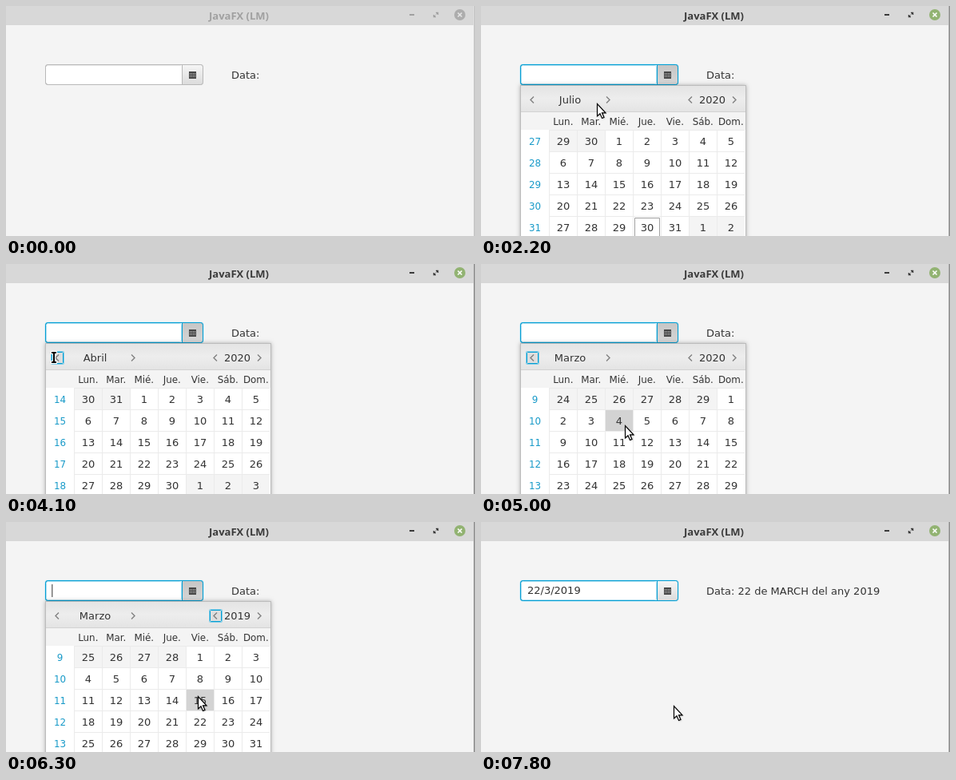
Recreate the animation shown at these times as an HTML page with a canvas. Size 587 px wide and 288 px high, loop 8000 ms.

```html
<!DOCTYPE html>
<html lang="es">
<head>
<meta charset="utf-8">
<title>JavaFX date picker</title>
<style>
  html, body { margin: 0; width: 587px; height: 288px; overflow: hidden; }
  canvas { display: block; }
</style>
</head>
<body>
<canvas id="stage" width="587" height="288"></canvas>
<script>
const LOOP = 8000, STEP = 100;
const ACTIVE = 1300, OPEN = 1600, PRESS = 2700, YEAR_BACK = 5700, CLOSE = 6700, COMMIT = 6900;
const ACCENT = '#039ed3', INK = '#333';
const GRID = { x: 85, y: 155, w: 35, h: 27 };
const TODAY = Date.UTC(2020, 6, 30), DAY = 864e5;
const MONTHS = ['Enero', 'Febrero', 'Marzo', 'Abril', 'Mayo', 'Junio', 'Julio'];
const WEEKDAYS = ['Lun.', 'Mar.', 'Mié.', 'Jue.', 'Vie.', 'Sáb.', 'Dom.'];
// pointer path: time, x, y
const PATH = [
  [300, 132, 0], [700, 192, 58], [1100, 240, 83], [1700, 240, 83],
  [2200, 145, 122], [2600, 50, 122], [3000, 57, 115], [3300, 57, 115],
  [3400, 60, 117], [4600, 60, 117], [4900, 140, 190], [5100, 220, 214],
  [5300, 298, 142], [5500, 264, 122], [5700, 264, 122], [6100, 252, 185],
  [6500, 228, 250], [7500, 228, 250], [7800, 241, 230], [LOOP, 241, 230]
];
const ctx = document.getElementById('stage').getContext('2d');

function rect(x, y, w, h, fill) {
  ctx.fillStyle = fill;
  ctx.fillRect(x, y, w, h);
}

function box(x, y, w, h, r, fill, stroke) {
  ctx.beginPath();
  ctx.roundRect(x, y, w, h, r);
  if (fill) { ctx.fillStyle = fill; ctx.fill(); }
  if (stroke) { ctx.strokeStyle = stroke; ctx.lineWidth = 1; ctx.stroke(); }
}

function line(points, color, width) {
  ctx.beginPath();
  points.forEach(([x, y]) => ctx.lineTo(x, y));
  ctx.strokeStyle = color;
  ctx.lineWidth = width;
  ctx.stroke();
}

function text(str, x, y, { size = 13, color = INK, align = 'left', font = '"DejaVu Sans", sans-serif', weight = 400 } = {}) {
  ctx.font = `${weight} ${size}px ${font}`;
  ctx.textAlign = align;
  ctx.fillStyle = color;
  ctx.fillText(str, x, y);
}

function gradient(y0, y1, ...colors) {
  const g = ctx.createLinearGradient(0, y0, 0, y1);
  colors.forEach((c, i) => g.addColorStop(i / (colors.length - 1), c));
  return g;
}

function pointerAt(t) {
  const i = PATH.findIndex(p => p[0] > t);
  const [t0, x0, y0] = PATH[i - 1], [t1, x1, y1] = PATH[i];
  const k = (t - t0) / (t1 - t0);
  return { x: Math.round(x0 + (x1 - x0) * k), y: Math.round(y0 + (y1 - y0) * k) };
}

function drawWindow(active) {
  rect(0, 0, 587, 288, '#f4f4f4');
  rect(0, 0, 585, 24, '#d8d8d8');
  rect(585, 0, 1, 288, active ? '#b4b4b4' : '#dcdcdc');
  rect(586, 0, 1, 288, active ? '#8c8c8c' : '#c0c0c0');
  const ink = active ? '#3a3a3a' : '#a0a0a0';
  text('JavaFX (LM)', 291.5, 17, { color: ink, align: 'center', font: '"Noto Sans", sans-serif', weight: 600 });
  rect(505, 10, 6, 2, ink);
  line([[538, 8.5], [540.5, 8.5], [540.5, 11]], ink, 1.5);
  line([[535.5, 11], [535.5, 13.5], [538, 13.5]], ink, 1.5);
  line([[538.5, 10.5], [540.5, 8.5]], ink, 1);
  line([[535.5, 13.5], [537.5, 11.5]], ink, 1);
  box(561, 4, 14, 14, 7, active ? '#92b372' : '#adadad');
  const cross = active ? '#fff' : '#e6e6e6';
  line([[565.5, 8.5], [570.5, 13.5]], cross, 1.6);
  line([[570.5, 8.5], [565.5, 13.5]], cross, 1.6);
}

function drawField(t) {
  const focused = t >= ACTIVE, pressed = t >= OPEN && t < COMMIT;
  const border = focused ? ACCENT : '#b8b8b8';
  if (focused) box(48.5, 72.5, 199, 27, 4, null, '#d3edf6');
  box(49.5, 73.5, 197, 25, 3, '#fff', border);
  rect(221, 74, 25, 24, pressed ? gradient(74, 98, '#c6c6c6', '#d6d6d6') : gradient(74, 98, '#f5f5f5', '#dcdcdc'));
  rect(220, 74, 1, 24, border);
  if (focused) box(50.5, 74.5, 169, 23, 2, null, '#b5e1f1');
  else rect(51, 74, 168, 1, '#ebebeb');
  box(49.5, 73.5, 197, 25, 3, null, border);
  rect(229, 82, 9, 9, '#444');
  for (let i = 0; i < 12; i++) rect(230 + i % 4 * 2, 84 + (i >> 2) * 2, 1, 1, '#d4d4d4');

  const done = t >= COMMIT;
  if (done) text('22/3/2019', 58, 90);
  text(done ? 'Data: 22 de MARCH del any 2019' : 'Data:', 282, 91);
  if (focused && Math.floor((t - ACTIVE) / 500) % 2 === 0) rect(57, 78, 1.5, 16, '#777');
}

function arrowButton(x, dir, focused) {
  if (focused) {
    box(x - 7.5, 109.5, 16, 16, 1, '#d9ecf3', '#7fcbe6');
    box(x - 6.5, 110.5, 14, 14, 1, '#dedede', ACCENT);
  }
  line([[x - 2 * dir, 113.5], [x + 2 * dir, 117.5], [x - 2 * dir, 121.5]], '#808080', 1.4);
}

function isoWeek(monday) {
  const thursday = monday + 3 * DAY;
  const newYear = Date.UTC(new Date(thursday).getUTCFullYear(), 0, 1);
  return Math.floor((thursday - newYear) / DAY / 7) + 1;
}

function drawPopup(t, pointer) {
  const back = [3400, 3700, 4000, 4300].filter(click => t >= click).length;
  const month = 6 - back, year = t >= YEAR_BACK ? 2019 : 2020;

  ctx.save();
  ctx.shadowColor = 'rgba(0,0,0,.3)';
  ctx.shadowBlur = 5;
  rect(49, 99, 283, 200, '#bcbcbc');
  ctx.restore();
  rect(50, 100, 281, 188, '#fff');
  rect(50, 100, 281, 32, gradient(100, 132, '#e4e4e4', '#ededed', '#e4e4e4'));
  rect(50, 132, 281, 1, '#d2d2d2');
  rect(50, 133, 281, 22, '#f4f4f4');

  arrowButton(64, -1, t >= PRESS && t < YEAR_BACK);
  arrowButton(159, 1);
  arrowButton(262, -1, t >= YEAR_BACK);
  arrowButton(317, 1);
  text(MONTHS[month], 111.5, 122, { align: 'center' });
  text(year, 289.5, 122, { align: 'center' });
  WEEKDAYS.forEach((d, i) => text(d, 102.8 + GRID.w * i, 149, { size: 11.9, align: 'center' }));

  const first = Date.UTC(year, month, 1);
  const start = first - (new Date(first).getUTCDay() + 6) % 7 * DAY;
  for (let i = 0; i < 35; i++) {
    const col = i % 7, row = Math.floor(i / 7), time = start + i * DAY, date = new Date(time);
    const x = GRID.x + col * GRID.w, y = GRID.y + row * GRID.h;
    if (!col) text(isoWeek(time), 67.5, y + 19, { size: 11.9, color: '#1a9bc9', align: 'center' });
    const hover = t > 4600 && pointer.x >= x && pointer.x < x + GRID.w && pointer.y >= y && pointer.y < y + GRID.h;
    rect(x, y, GRID.w, GRID.h, '#ebebeb');
    rect(x + 1, y + 1, GRID.w - 1, GRID.h - 1, hover ? '#d3d3d3' : date.getUTCMonth() === month ? '#fff' : '#f4f4f4');
    if (time === TODAY) box(x + 2.5, y + 2.5, 31, 23, 0, null, '#a0a0a0');
    text(date.getUTCDate(), x + 18, y + 19, { align: 'center' });
  }
}

function drawPointer({ x, y }, beam) {
  ctx.save();
  ctx.translate(x, y);
  if (beam) {
    for (const [color, pad] of [['#fff', 1], ['#000', 0]]) {
      for (const [bx, by, w, h] of [[-3, -7, 6, 2], [-1, -7, 2, 14], [-3, 5, 6, 2]])
        rect(bx - pad, by - pad, w + 2 * pad, h + 2 * pad, color);
    }
  } else {
    ctx.shadowColor = 'rgba(0,0,0,.25)';
    ctx.shadowBlur = 2;
    ctx.shadowOffsetX = ctx.shadowOffsetY = 1;
    const shape = new Path2D('M.5 .5V16L4 12.8 6.5 18.5 9 17.4 6.5 11.8H11Z');
    ctx.fillStyle = '#fff';
    ctx.fill(shape);
    ctx.shadowColor = 'transparent';
    ctx.strokeStyle = '#000';
    ctx.lineWidth = 1.2;
    ctx.stroke(shape);
  }
  ctx.restore();
}

function draw() {
  const t = Math.floor(performance.now() % LOOP / STEP) * STEP;
  const pointer = t >= PATH[0][0] ? pointerAt(t) : null;
  drawWindow(t >= ACTIVE);
  drawField(t);
  if (t >= OPEN && t < CLOSE) drawPopup(t, pointer);
  if (pointer) drawPointer(pointer, t >= 3400 && t < 6000 && pointer.y < 133);
  requestAnimationFrame(draw);
}
draw();
</script>
</body>
</html>
```
